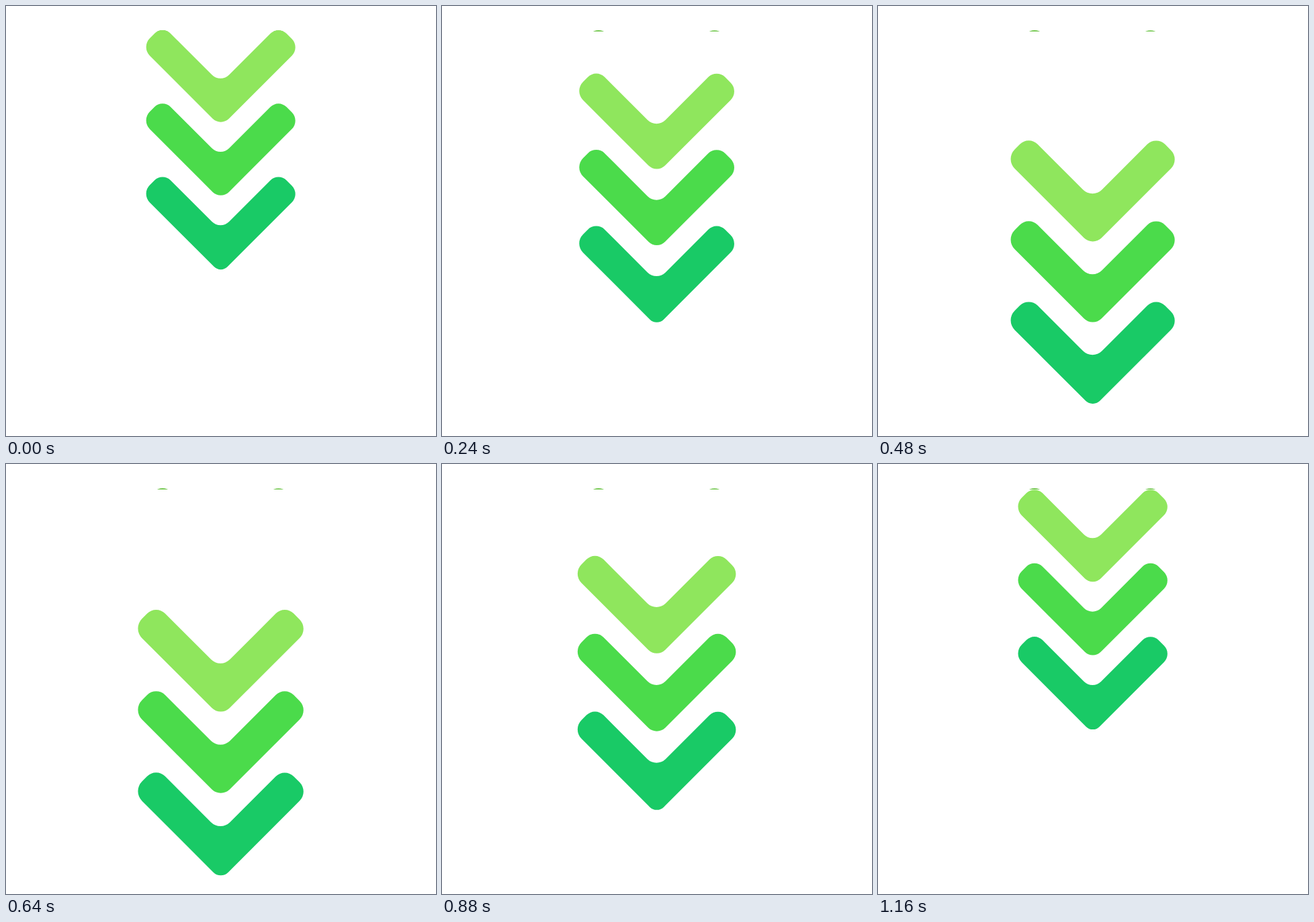
These frames come from a looping animation (640 by 640 pixels, 1200 ms). An HTML page:

```html
<!DOCTYPE html>
<html lang="en">
<head>
<meta charset="utf-8">
<title>Down arrows</title>
<style>
  @property --tick {
    syntax: "<number>";
    inherits: false;
    initial-value: 0;
  }

  html, body {
    margin: 0;
    width: 100%;
    height: 100%;
    overflow: hidden;
    background: #fff;
  }

  svg {
    display: block;
    width: 100%;
    height: 100%;
  }

  /* 30 ticks of 40 ms: 15 down, 15 back, smoothstep easing each way */
  .arrows {
    --x: calc(min(var(--tick), 30 - var(--tick)) / 15);
    --p: calc(var(--x) * var(--x) * (3 - 2 * var(--x)));
    transform-origin: 320px 36px;
    transform: translateY(calc(var(--p) * 183.3px)) scale(calc(1 + var(--p) * 0.111));
    animation: tick 1200ms steps(30, end) infinite;
  }

  @keyframes tick {
    from { --tick: 0; }
    to { --tick: 30; }
  }
</style>
</head>
<body>
<svg viewBox="0 0 640 640">
  <defs>
    <path id="chevron" d="M221 41 A17 17 0 0 1 245 41 L306.6 102.6 A18 18 0 0 0 332 102.6
      L393.5 41.1 A17 17 0 0 1 417.5 41.1 L425.5 49.1 A17.5 17.5 0 0 1 425.5 73.9
      L331.7 167.7 A17 17 0 0 1 307.7 167.7 L214 74 A18.4 18.4 0 0 1 214 48 Z"/>
    <clipPath id="rim"><rect x="200" y="30" width="240" height="8"/></clipPath>
  </defs>

  <!-- thin marks that stay at the resting height -->
  <g clip-path="url(#rim)"><use href="#chevron" fill="#74c850"/></g>

  <g class="arrows">
    <use href="#chevron" fill="#8fe65d"/>
    <use href="#chevron" y="109.2" fill="#4bdb4b"/>
    <!-- the lowest arrow has a sharper tip -->
    <path transform="translate(0 218.4)" fill="#19ca66"
      d="M221 41 A17 17 0 0 1 245 41 L306.6 102.6 A18 18 0 0 0 332 102.6
      L393.5 41.1 A17 17 0 0 1 417.5 41.1 L425.5 49.1 A17.5 17.5 0 0 1 425.5 73.9
      L329.7 169.7 A14.1 14.1 0 0 1 309.7 169.7 L214 74 A18.4 18.4 0 0 1 214 48 Z"/>
  </g>
</svg>
</body>
</html>
```
